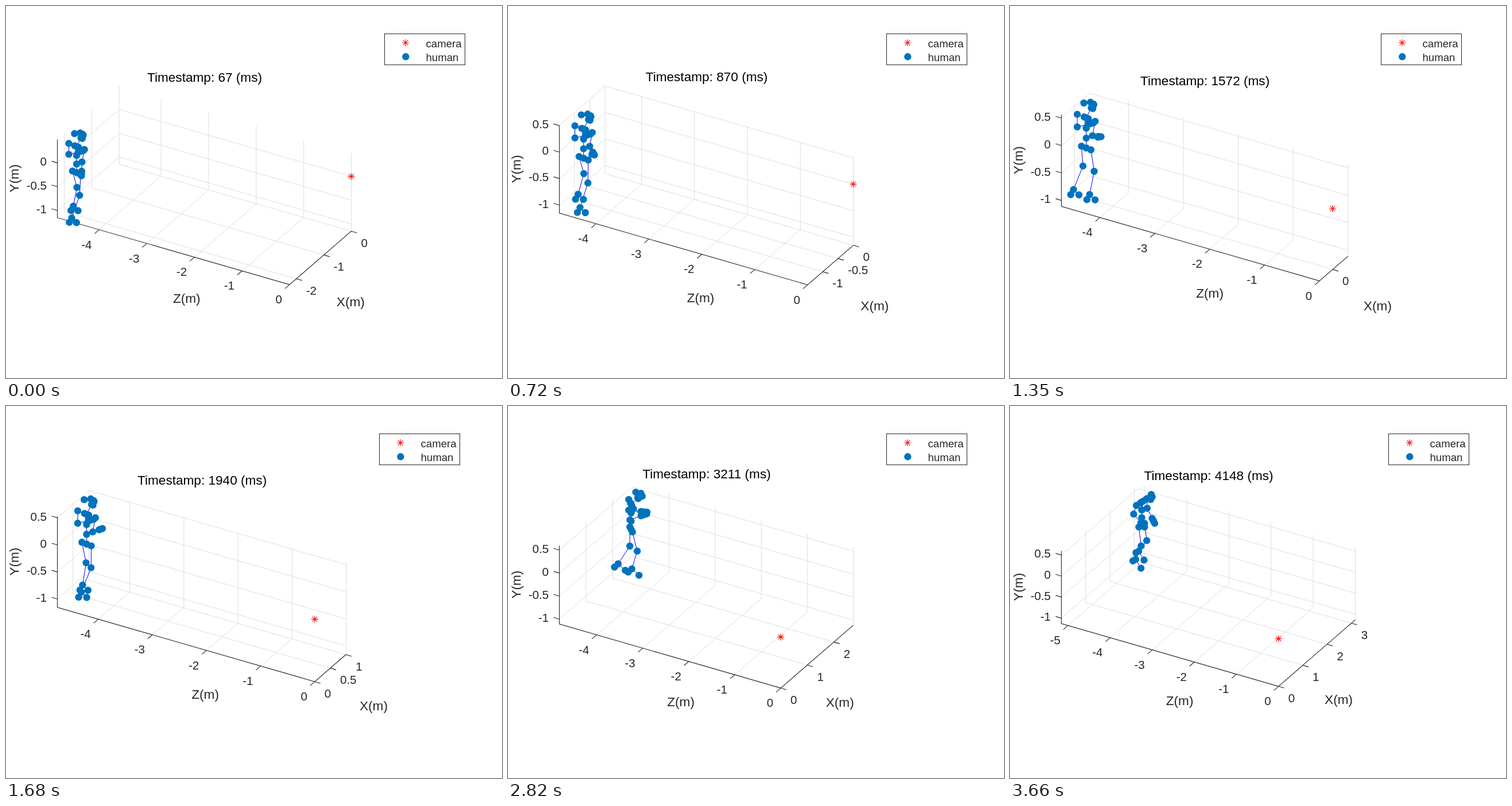
An HTML page that plays this animation: 864x648 px, repeating every 3.69 s.

```html
<!DOCTYPE html>
<html lang="en">
<head>
<meta charset="utf-8">
<title>Skeleton tracking</title>
<style>
  html, body { margin: 0; width: 100%; height: 100%; overflow: hidden; background: #fff; }
  svg { display: block; width: 864px; height: 648px; font-family: "Liberation Sans", Arial, sans-serif; }
  path { fill: none; }
  text { fill: #262626; }
</style>
</head>
<body>
<svg viewBox="0 0 864 648">
  <path id="grid" stroke="#dedede"/>
  <path id="rulers" stroke="#262626" stroke-width="1.1"/>
  <g id="ticks" font-size="20.5"></g>
  <g font-size="22.6" text-anchor="middle">
    <text id="xName">X(m)</text>
    <text id="yName">Y(m)</text>
    <text id="zName">Z(m)</text>
    <text id="title" style="fill:#000"></text>
  </g>
  <path id="bones" stroke="#00f"/>
  <path id="dots" stroke="#0072bd" stroke-width="12.4" stroke-linecap="round"/>
  <path id="camera" stroke="#f00" stroke-width="1.1"/>
  <g id="legend">
    <rect x="659.5" y="48.5" width="140" height="54" fill="#fff" stroke="#262626"/>
    <path id="star" stroke="#f00" stroke-width="1.1"/>
    <circle cx="696.3" cy="88.3" r="6.2" fill="#0072bd"/>
    <g font-size="18.6">
      <text x="731.5" y="71.5">camera</text>
      <text x="731.5" y="96">human</text>
    </g>
  </g>
</svg>
<script>
const FRAMES = 123, STEP = 30;
const LEFT = 89.5, RIGHT = 601.5, MIDDLE = 312.5;
const KEYS = [0, 13, 34, 56, 78, 94, 122];
const el = id => document.getElementById(id);
const fix = v => v.toFixed(1);
const rad = deg => deg * Math.PI / 180;
const clamp = v => Math.min(1, Math.max(0, v));

// Smooth curve through one value per key time.
function curve(...v) {
  const last = KEYS.length - 1;
  const slope = i => {
    const a = Math.max(0, i - 1), b = Math.min(last, i + 1);
    return (v[b] - v[a]) / (KEYS[b] - KEYS[a]);
  };
  return f => {
    let i = 0;
    while (i < last - 1 && f >= KEYS[i + 1]) i++;
    const d = KEYS[i + 1] - KEYS[i], u = (f - KEYS[i]) / d;
    const w = u * u * (3 - 2 * u);
    return v[i] * (1 - w) + v[i + 1] * w
      + d * u * (1 - u) * (slope(i) * (1 - u) - slope(i + 1) * u);
  };
}

// Path of the pelvis in metres, and the axis ends that the body pushes.
const walkX = curve(-1.81, -1.59, -0.514, 0.55, 1.57, 2.27, 2.7);
const walkY = curve(-0.38, -0.334, -0.232, -0.195, -0.186, -0.116, -0.04);
const walkZ = curve(-4.73, -4.531, -4.482, -4.533, -4.517, -4.562, -4.807);
const minZ = curve(-4.88, -4.76, -4.66, -4.755, -4.71, -4.81, -5.157);
const minY = curve(-1.15, -1.24, -1.08, -1.154, -1.126, -1.108, -1.13);

function layout(f) {
  const x0 = Math.min(0, walkX(f) - 0.44), x1 = Math.max(0, walkX(f) + 0.46);
  const y0 = minY(f), y1 = y0 + 1.64 + 0.0007 * f, z0 = minZ(f);
  const dX = x1 - x0, xStep = dX < 2 ? 0.5 : 1;
  // Wide tick labels push the axis name out and shrink the plot.
  const base = 97 + (x0 <= -xStep ? 8 : 0) + (xStep < 1 ? 17.5 : 0);
  let right = RIGHT, s, dx;
  for (let i = 0; i < 6; i++) {
    s = (right - LEFT) / (0.866 * -z0 + 0.5 * dX);
    dx = 0.5 * dX * s;
    right = Math.min(RIGHT, 666 - base + 0.75 * dx);
  }
  const bottom = MIDDLE + s * (0.25 * -z0 + 0.433 * dX + 0.866 * (y1 - y0)) / 2;
  const corner = right - dx;
  const at = (x, y, z) => [
    corner + s * (0.866 * z + 0.5 * (x - x0)),
    bottom + s * (0.25 * z - 0.433 * (x - x0) - 0.866 * (y - y0))
  ];
  return { x0, x1, y0, y1, z0, dx, right, bottom, corner, xStep, at,
           xOff: base + 0.25 * (dx - 102) };
}

const CHAINS = [
  "pelvis navel chest neck head nose", "nose eyeL earL", "nose eyeR earR",
  "hipL pelvis hipR", "hipL kneeL ankleL toeL", "hipR kneeR ankleR toeR",
  "ankleL heelL", "ankleR heelR",
  "chest clavicleL shoulderL elbowL wristL handL tipL", "wristL thumbL",
  "chest clavicleR shoulderR elbowR wristR handR tipR", "wristR thumbR"
].map(c => c.split(" "));

const mix = (a, b, t) => a.map((v, i) => v + (b[i] - v) * t);
const add = (a, ...b) => a.map((v, i) => v + b[i]);

// Joints as [forward, right, up] from the pelvis, in metres.
function body(f) {
  const p = { pelvis: [0, 0, 0], navel: [0, 0, 0.18], chest: [0, 0, 0.36], neck: [0, 0, 0.55] };
  p.head = add(p.neck, 0.13, 0, 0.12);
  p.nose = add(p.head, 0.09, -0.02, 0.01);
  p.eyeL = add(p.head, 0.08, -0.08, 0.04);
  p.eyeR = add(p.head, 0.08, -0.02, 0.03);
  p.earL = add(p.head, 0, -0.15, 0.037);
  p.earR = add(p.head, 0, 0.03, 0);

  const turn = clamp((f - 74) / 48), drop = clamp((f - 94) / 28);
  const stride = 0.16 * (1 - 0.7 * turn);
  for (const [c, side] of [["L", -1], ["R", 1]]) {
    const phase = 2 * Math.PI * (f / 26 - 0.07) + (side > 0 ? Math.PI : 0);
    const lift = 0.12 * Math.max(0, -Math.sin(phase));
    const hip = p["hip" + c] = [0, 0.095 * side, 0];
    const ankle = p["ankle" + c] = add(hip, -0.12 + stride * Math.cos(phase), 0, lift - 0.8);
    p["knee" + c] = add(mix(hip, ankle, 0.5), 0.1 + 0.4 * lift, 0, -0.03);
    p["heel" + c] = add(ankle, -0.07, 0, -0.06);
    p["toe" + c] = add(ankle, 0.14, 0, -0.16);

    // The left forearm stays up, the right one rises on the way.
    const bend = rad(side < 0 ? 80 - 35 * drop : Math.min(10 + 1.1 * f, 98) - 55 * drop);
    const shoulder = p["shoulder" + c] = add(p.neck, 0, 0.18 * side, 0);
    const elbow = p["elbow" + c] = add(shoulder, side < 0 ? 0 : -0.07, 0, -0.23);
    const wrist = p["wrist" + c] = add(elbow, 0.23 * Math.sin(bend), -0.04 * side, -0.23 * Math.cos(bend));
    p["clavicle" + c] = mix(p.neck, shoulder, 0.23);
    p["hand" + c] = mix(elbow, wrist, 1.25);
    p["tip" + c] = mix(elbow, wrist, 1.5);
    p["thumb" + c] = add(p["hand" + c], -0.02, -0.02, -0.01);
  }
  return p;
}

function pose(f, at) {
  const yaw = rad(-8 - 90 * clamp((f - 74) / 48)), c = Math.cos(yaw), s = Math.sin(yaw);
  const p = body(f);
  for (const n in p) {
    const [ahead, right, up] = p[n];
    p[n] = at(walkX(f) + ahead * c + right * s, walkY(f) + up, walkZ(f) - ahead * s + right * c);
  }
  return p;
}

const path = pts => "M" + pts.map(q => fix(q[0]) + " " + fix(q[1])).join("L");
const stroke = (q, x, y) => path([q, [q[0] + x, q[1] + y]]);

function star([x, y]) {
  const r = 6, d = 4.3;
  return [[r, 0], [0, r], [d, d], [d, -d]]
    .map(([a, b]) => path([[x - a, y - b], [x + a, y + b]])).join("");
}

function ticksIn(a, b, step) {
  const out = [];
  for (let i = Math.ceil(a / step); i <= Math.floor(b / step); i++) out.push(i * step);
  return out;
}

function place(id, x, y) {
  el(id).setAttribute("x", fix(x));
  el(id).setAttribute("y", fix(y));
}

function draw(f) {
  const v = layout(f), { x0, x1, y0, y1, z0, at } = v;
  let grid = "", labels = "";
  let rulers = path([at(x0, y1, z0), at(x0, y0, z0), at(x0, y0, 0), at(x1, y0, 0)]);
  const label = (q, x, y, anchor, n) => {
    labels += `<text x="${fix(q[0] + x)}" y="${fix(q[1] + y)}" text-anchor="${anchor}">${n}</text>`;
  };
  for (const x of ticksIn(x0, x1, v.xStep)) {
    const q = at(x, y0, 0);
    grid += path([q, at(x, y0, z0), at(x, y1, z0)]);
    rulers += stroke(q, 10, 3);
    label(q, 17, 27.5, "start", x);
  }
  for (const z of ticksIn(z0, 0, 1)) {
    const q = at(x0, y0, z);
    grid += path([q, at(x1, y0, z), at(x1, y1, z)]);
    rulers += stroke(q, -8, 7);
    label(q, -13, 32.8, "end", z);
  }
  for (const y of ticksIn(y0, y1, 0.5)) {
    const q = at(x0, y, z0);
    grid += path([q, at(x1, y, z0), at(x1, y, 0)]);
    rulers += stroke(q, -10, -3);
    label(q, -18.5, 4.8, "end", y);
  }
  el("grid").setAttribute("d", grid);
  el("rulers").setAttribute("d", rulers);
  el("ticks").innerHTML = labels;

  const extra = v.corner - LEFT - 408, zMid = at(x0, y0, z0 / 2);
  place("xName", v.corner + v.xOff, v.bottom + 64 - 0.25 * v.dx);
  place("zName", zMid[0] + 24 + 0.235 * extra, zMid[1] + 90 + 0.1 * extra);
  const yMid = at(x0, (y0 + y1) / 2, z0)[1];
  el("yName").setAttribute("transform", `translate(22 ${fix(yMid - 0.5)}) rotate(-90)`);
  place("title", (LEFT + v.right) / 2 + 0.5, 617 - v.bottom);
  el("title").textContent = `Timestamp: ${Math.round(67 + 33.45 * f)} (ms)`;
  el("legend").setAttribute("transform", `translate(${Math.round(v.right - RIGHT)} 0)`);

  const p = pose(f, at);
  el("bones").setAttribute("d", CHAINS.map(c => path(c.map(n => p[n]))).join(""));
  el("dots").setAttribute("d", Object.values(p).map(q => stroke(q, 0, 0)).join(""));
  el("camera").setAttribute("d", star(at(0, 0, 0)));
}

el("star").setAttribute("d", star([696, 64]));
let shown = -1;
const start = performance.now();
function tick() {
  const f = Math.floor(Math.max(0, performance.now() - start) / STEP) % FRAMES;
  if (f !== shown) draw(shown = f);
  requestAnimationFrame(tick);
}
tick();
</script>
</body>
</html>
```
